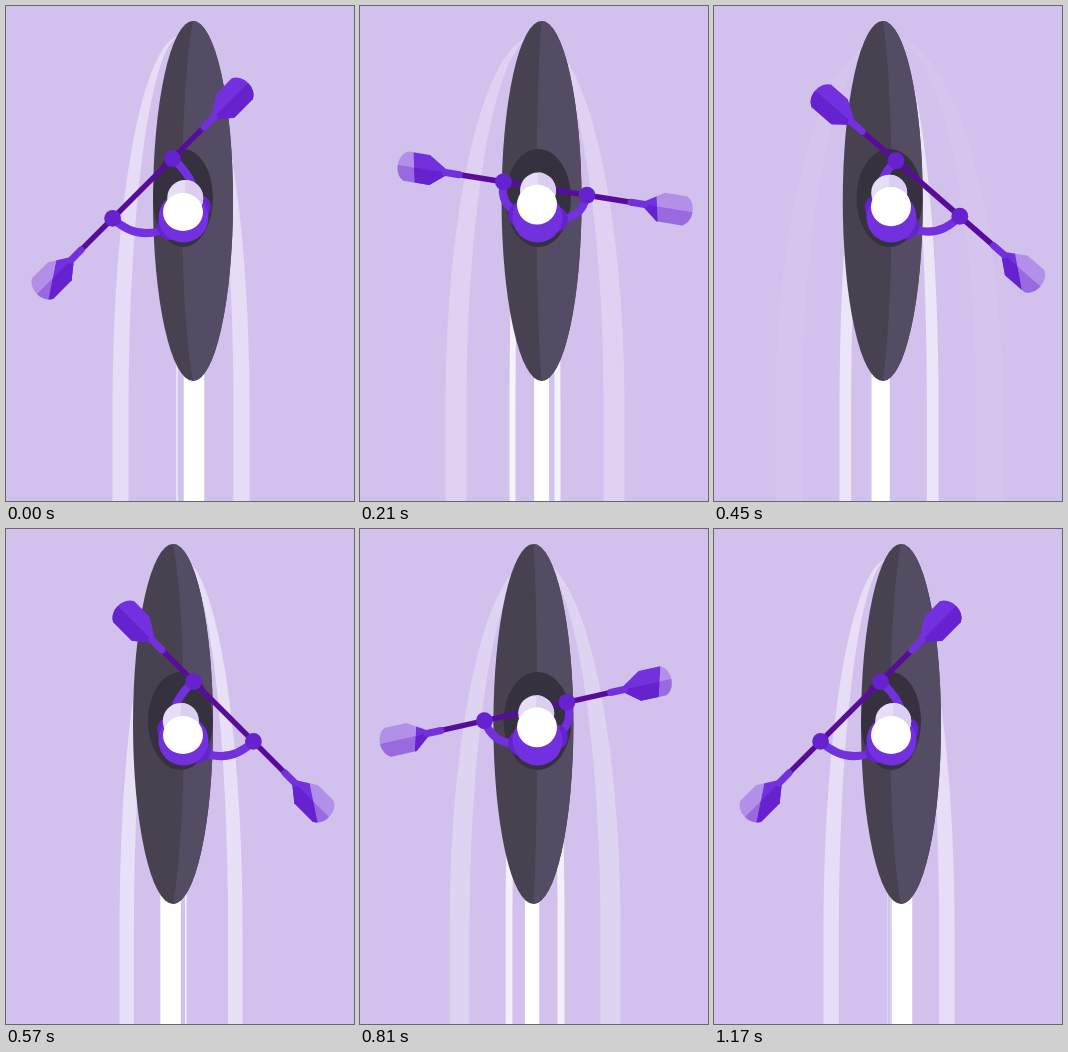
Recreate the animation shown at these times as an HTML page with a canvas. Size 348 by 495 pixels, loop 1200 ms.

```html
<!DOCTYPE html>
<html lang="en">
<head>
<meta charset="utf-8">
<title>Kayak</title>
<style>
  html, body { margin: 0; width: 100%; height: 100%; overflow: hidden; background: #d2c1ec; }
  canvas { display: block; }
</style>
</head>
<body>
<canvas id="stage" width="348" height="495"></canvas>
<script>
const ctx = document.getElementById('stage').getContext('2d');
const W = 348, H = 495, LOOP = 1200, FRAME = 30;
const TURN = 570, STROKE_END = 1170;
const AXIS = 177, WAKE_X = 175;
const C = {
  water: '#d2c1ec', hullDark: '#48414f', hullLight: '#544c62', cockpit: '#36313f',
  purple: '#7230de', violet: '#6722d0', shaft: '#570d99',
  capLight: '#e6ddf6', capShade: '#dbcef1'
};
// How far out along the shaft the water covers each blade, over one stroke
const ENTERING = [[0, 175], [0.2, 139], [0.37, 113], [0.6, 111], [1, 127]];
const LEAVING = [[0, 127], [0.2, 111], [0.37, 133], [0.6, 165], [1, 175]];

const easeOut = u => 1 - (1 - u) ** 2;
const easeInOut = u => u < 0.5 ? 2 * u * u : 1 - 2 * (1 - u) ** 2;
const mix = (a, b, p) => a + (b - a) * p;

function track(points, u) {
  const i = Math.max(1, points.findIndex(p => p[0] >= u));
  const [u0, v0] = points[i - 1], [u1, v1] = points[i];
  return mix(v0, v1, (u - u0) / (u1 - u0));
}

function oval(x, y, rx, ry, color) {
  ctx.fillStyle = color;
  ctx.beginPath();
  ctx.ellipse(x, y, rx, ry, 0, 0, 7);
  ctx.fill();
}

const disc = (x, y, r, color) => oval(x, y, r, r, color);

function line(x0, x1, width, color, cap) {
  ctx.strokeStyle = color;
  ctx.lineWidth = width;
  ctx.lineCap = cap;
  ctx.beginPath();
  ctx.moveTo(x0, 0);
  ctx.lineTo(x1, 0);
  ctx.stroke();
}

function arch(half) {
  ctx.moveTo(WAKE_X - half, H + 5);
  ctx.lineTo(WAKE_X - half, 400);
  ctx.ellipse(WAKE_X, 400, half, 370, 0, Math.PI, 2 * Math.PI);
  ctx.lineTo(WAKE_X + half, H + 5);
  ctx.closePath();
}

function drawWake(t, born) {
  const half = ((t - born + LOOP) % LOOP) * 0.1;
  if (half <= 0) return;
  ctx.globalAlpha = Math.max(0, 1 - half / 120);
  ctx.fillStyle = '#fff';
  ctx.beginPath();
  arch(half);
  arch(half * 0.765);
  ctx.fill('evenodd');
  ctx.globalAlpha = 1;
}

function drawTrail(cx) {
  const d = (cx - AXIS) / 10;
  const width = 13.5 + 7 * d * d;
  ctx.fillStyle = '#fff';
  ctx.fillRect(cx - 0.7 + 1.7 * d - width / 2, 330, width, H - 330);
}

function drawHull(cx) {
  const d = cx - AXIS, bulge = -1.1 * d * 4 / 3;
  oval(cx, 195, 40, 180, C.hullDark);
  ctx.fillStyle = C.hullLight;
  ctx.beginPath();
  ctx.ellipse(cx, 195, 40, 180, 0, -Math.PI / 2, Math.PI / 2);
  ctx.bezierCurveTo(cx + bulge, 300, cx + bulge, 90, cx, 15);
  ctx.fill();

  const left = 144.5 + 0.25 * d, right = 212 - 0.05 * d * d;
  ctx.save();
  ctx.beginPath();
  ctx.ellipse(cx, 195, 40, 180, 0, 0, 7);
  ctx.clip();
  oval((left + right) / 2, 192, (right - left) / 2, 49, C.cockpit);
  ctx.restore();
}

function bladeShape() {
  ctx.save();
  ctx.beginPath();
  ctx.moveTo(101, -3.5);
  ctx.lineTo(119, -14.8);
  ctx.lineTo(141, -14.8);
  ctx.bezierCurveTo(152, -10, 152, 10, 141, 14.8);
  ctx.lineTo(115, 14.8);
  ctx.lineTo(101, 3.5);
  ctx.closePath();
  ctx.clip();
  ctx.fillStyle = C.purple;
  ctx.fillRect(95, -20, 65, 40);
  ctx.fillStyle = C.violet;
  ctx.fillRect(95, 0, 65, 20);
  ctx.restore();
}

function drawBlade(side, angle, cut) {
  const tilt = -1.25 * angle * side;
  ctx.save();
  ctx.scale(side, 1);
  for (const wet of [false, true]) {
    ctx.save();
    ctx.translate(cut, 0);
    ctx.rotate(tilt);
    ctx.beginPath();
    ctx.rect(wet ? 0 : -200, -200, 200, 400);
    ctx.clip();
    ctx.rotate(-tilt);
    ctx.translate(-cut, 0);
    ctx.globalAlpha = wet ? 0.34 : 1;
    bladeShape();
    ctx.restore();
  }
  line(87, 101, 7, C.purple, 'round');
  ctx.restore();
}

function drawPaddle(x, angle, leftCut, rightCut) {
  ctx.save();
  ctx.translate(x, 182.5);
  ctx.rotate(angle);
  line(-90, 90, 5.5, C.shaft, 'butt');
  drawBlade(-1, angle, leftCut);
  drawBlade(1, angle, rightCut);
  ctx.restore();
}

function drawArm(side, shoulder, hand, angle) {
  const dx = hand.x - shoulder.x, dy = hand.y - shoulder.y;
  const len = Math.hypot(dx, dy);
  const bend = (16 + 6 * side * Math.sin(angle)) * side / len;
  ctx.strokeStyle = C.purple;
  ctx.lineWidth = 8;
  ctx.lineCap = 'round';
  ctx.beginPath();
  ctx.moveTo(shoulder.x, shoulder.y);
  ctx.quadraticCurveTo(
    (shoulder.x + hand.x) / 2 - dy * bend,
    (shoulder.y + hand.y) / 2 + dx * bend,
    hand.x, hand.y);
  ctx.stroke();
}

function drawRower(cx, paddleX, angle, lift) {
  const polar = (x, y, r, a) => ({ x: x + r * Math.cos(a), y: y + r * Math.sin(a) });
  const sides = [-1, 1].map(side => ({
    side,
    shoulder: polar(178, 211, 17 * side, angle * 0.8),
    hand: polar(paddleX, 182.5, 42.3 * side, angle)
  }));

  for (const s of sides) drawArm(s.side, s.shoulder, s.hand, angle);
  for (const s of sides) disc(s.shoulder.x, s.shoulder.y, 13, C.violet);
  disc(177.5, 211.5, 25, C.purple);
  for (const s of sides) disc(s.hand.x, s.hand.y, 8.4, C.violet);

  const headY = 206 - lift, capX = AXIS + 0.22 * (cx - AXIS);
  disc(capX, headY - 14, 18, C.capLight);
  ctx.fillStyle = C.capShade;
  ctx.beginPath();
  ctx.arc(capX, headY - 14, 18, -Math.PI / 2, Math.PI / 2);
  ctx.fill();
  oval(AXIS, headY, 20, 19 + lift / 8, '#fff');
}

function draw(t) {
  const back = t >= TURN;
  const u = back ? Math.min(1, (t - TURN) / (STROKE_END - TURN)) : t / TURN;
  const swing = back ? 1 - easeOut(u) : easeOut(u);
  const drift = back ? 1 - easeInOut(u) : easeInOut(u);
  const angle = mix(-Math.PI / 4, Math.PI / 4, swing);
  const paddleX = mix(136.5, 217.5, swing);
  const cx = mix(187, 167, drift);
  const entering = track(ENTERING, u), leaving = track(LEAVING, u);

  ctx.fillStyle = C.water;
  ctx.fillRect(0, 0, W, H);
  drawWake(t, 515);
  drawWake(t, -45);
  drawTrail(cx);
  drawHull(cx);
  drawPaddle(paddleX, angle, back ? entering : leaving, back ? leaving : entering);
  drawRower(cx, paddleX, angle, 8 * 4 * u * (1 - u));
}

const start = performance.now();
function tick() {
  const t = (performance.now() - start) % LOOP;
  draw(Math.floor(t / FRAME) * FRAME);
  requestAnimationFrame(tick);
}
tick();
</script>
</body>
</html>
```
